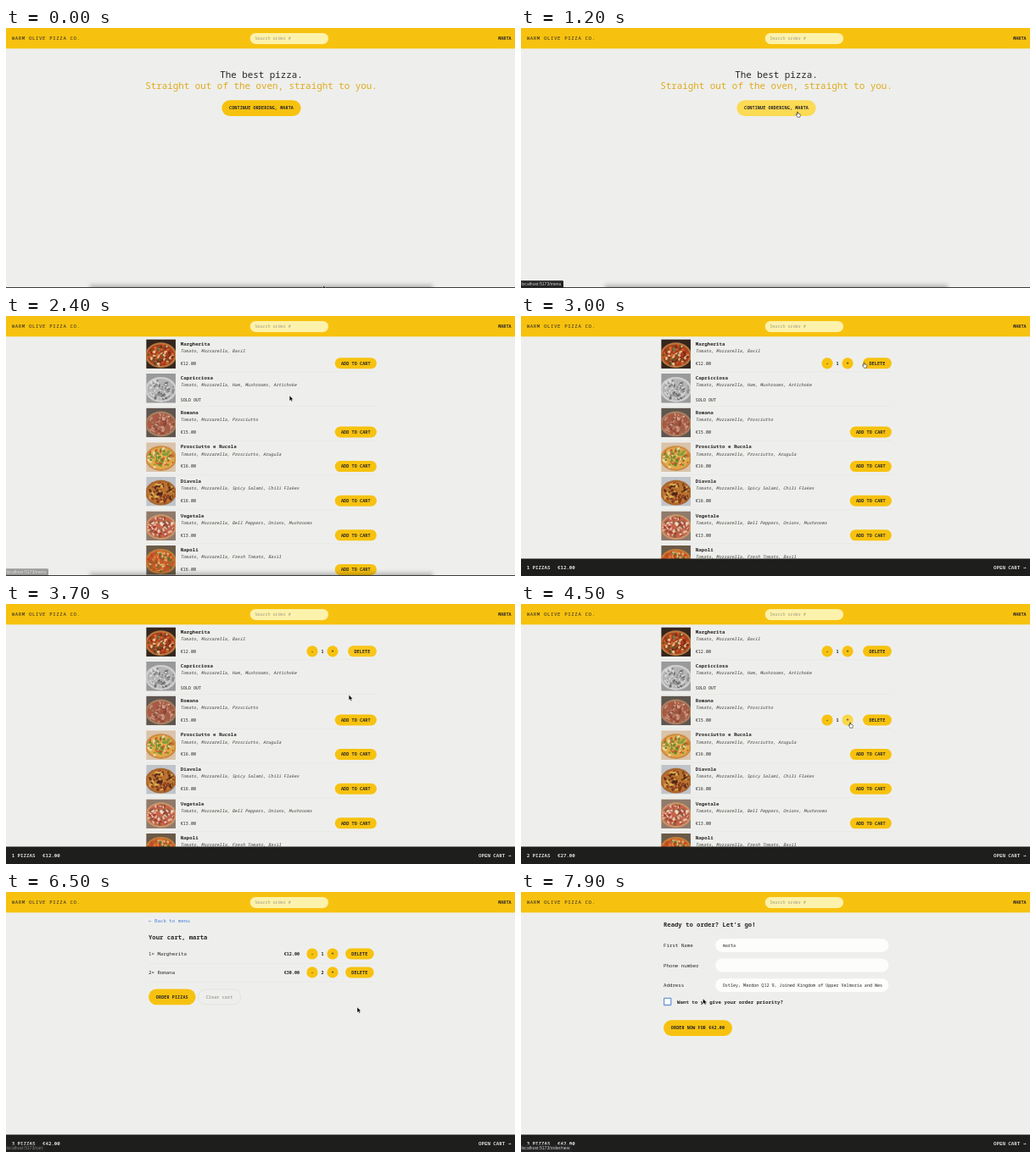
These frames come from a looping animation (600x307 px, 8000 ms). An HTML page:

```html
<!DOCTYPE html>
<html lang="en">
<head>
<meta charset="utf-8">
<title>Pizza ordering</title>
<style>
  html, body { margin: 0; width: 100%; height: 100%; overflow: hidden; background: #eeefec; }
  svg { display: block; }
  #stage { width: 100vw; height: 100vh; }
  text { font-family: "Roboto Mono", "Noto Sans Mono", "DejaVu Sans Mono", monospace; white-space: pre; }
  .arrow { font-family: "DejaVu Sans Mono", monospace; }
  .status { font-family: "Liberation Sans", Arial, sans-serif; }
</style>
</head>
<body>
<svg id="stage" viewBox="0 0 600 307" preserveAspectRatio="none"></svg>
<script>
const LOOP = 8000, STEP = 100;
const YELLOW = [247, 194, 15], LIT = [251, 218, 84];
const INK = '#292524', RULE = '#e2e2df';
const BASE = 5.79, SMALL = 5.07, LARGE = 7.24, HUGE = 10.86;
const USER = 'marta';

const rgb = c => `rgb(${c.map(Math.round)})`;
const clamp = v => Math.max(0, Math.min(1, v));
const mix = (a, b, k) => a + (b - a) * k;

function el(tag, attrs, parent) {
  const node = document.createElementNS('http://www.w3.org/2000/svg', tag);
  for (const k in attrs) node.setAttribute(k, attrs[k]);
  parent.appendChild(node);
  return node;
}
const stage = document.getElementById('stage');
const group = parent => el('g', {}, parent);
const show = (node, on) => { node.style.display = on ? '' : 'none'; };

function rect(parent, x, y, width, height, fill, more) {
  return el('rect', { x, y, width, height, fill, ...more }, parent);
}

// y is the vertical middle of the capitals
function label(parent, str, x, y, size = BASE, more = {}) {
  const node = el('text', { x, y: y + size * 0.36, 'font-size': size, fill: INK, ...more }, parent);
  node.textContent = str;
  return node;
}
const MEDIUM = { 'font-weight': 500 };
const BOLD = { 'font-weight': 600 };
const MID = { 'text-anchor': 'middle' };
const END = { 'text-anchor': 'end' };

function pill(parent, str, x, y, width, height) {
  const box = rect(parent, x, y - height / 2, width, height, rgb(YELLOW), { rx: height / 2 });
  label(parent, str, x + width / 2, y, SMALL, { ...BOLD, ...MID, 'letter-spacing': 0.127 });
  return box;
}

function stepper(parent, y) {
  const dot = (x, sign) => {
    const c = el('circle', { cx: x, cy: y, r: 6.6, fill: rgb(YELLOW) }, parent);
    label(parent, sign, x, y, SMALL, { ...BOLD, ...MID });
    return c;
  };
  dot(361, '-');
  const plus = dot(385, '+');
  const count = label(parent, '1', 373, y, SMALL, { ...MID, ...BOLD });
  return { plus, count };
}

// ---- page and header
const page = group(stage);
rect(page, -20, -20, 640, 350, '#eeefec');
const home = group(page), menu = group(page), cart = group(page), form = group(page);
rect(page, -20, -20, 640, 44.3, rgb(YELLOW));
label(page, 'WARM OLIVE PIZZA CO.', 6.7, 12.4, BASE, { 'letter-spacing': 0.579 });
rect(page, 287.7, 5.9, 92.3, 13, '#fdf2ab', { rx: 6.5 });
label(page, 'Search order #', 293.3, 12.4, SMALL, { fill: '#a39d84' });
label(page, USER.toUpperCase(), 595.5, 12.4, SMALL, { ...END, ...BOLD });

// ---- home
label(home, 'The best pizza.', 301, 55, HUGE, { ...MID, ...MEDIUM });
label(home, 'Straight out of the oven, straight to you.', 301, 68, HUGE,
  { ...MID, ...MEDIUM, fill: '#dfa91b' });
const goOn = pill(home, `CONTINUE ORDERING, ${USER.toUpperCase()}`, 254.4, 94.6, 93.2, 18.8);

// ---- menu
// name, toppings, price, backdrop, crust, sauce, topping colours
const PIZZAS = [
  ['Margherita', 'Basil', 12, '#35261d', '#b9773d', '#a8401f', ['#e9d3a0', '#d9622c', '#5b5a28', '#6f2415']],
  ['Capricciosa', 'Ham, Mushrooms, Artichoke', 0, '#9a9a9a', '#cfcfcf', '#b4b4b4', ['#e0e0e0', '#636363', '#8a8a8a', '#d0d0d0']],
  ['Romana', 'Prosciutto', 15, '#5f5650', '#a9805f', '#a85a45', ['#c98a72', '#8a4434', '#d0ab93', '#96604c']],
  ['Prosciutto e Rucola', 'Prosciutto, Arugula', 16, '#d9c3aa', '#cf8a42', '#dfa949', ['#5b8a2c', '#cf4a2a', '#7d9a3c', '#f0dba0']],
  ['Diavola', 'Spicy Salami, Chili Flakes', 16, '#bfc4c9', '#a9652f', '#b9742f', ['#6b2a1a', '#8e3a1f', '#e3b757', '#4c2117']],
  ['Vegetale', 'Bell Peppers, Onions, Mushrooms', 13, '#8f7a6c', '#cb9468', '#c2644a', ['#f0e0d0', '#e6c3ab', '#a53a28', '#7a6040']],
  ['Napoli', 'Fresh Tomato, Basil', 16, '#6b5a48', '#c57d36', '#bf5a2b', ['#e8c37d', '#c8401f', '#557033', '#e08a3c']],
];

function photo(parent, x, y, seed, [back, crust, sauce, spots]) {
  const p = el('svg', { x, y, width: 34.8, height: 34.75, viewBox: '0 0 35 35' }, parent);
  const rnd = () => (seed = (seed * 16807) % 2147483647) / 2147483647;
  const cx = 17.5, cy = 19;
  rect(p, 0, 0, 35, 35, back);
  el('ellipse', { cx, cy, rx: 18.5, ry: 15, fill: crust }, p);
  el('ellipse', { cx, cy, rx: 16.3, ry: 12.8, fill: sauce }, p);
  for (let i = 0; i < 80; i++) {
    const a = rnd() * 6.283, d = Math.sqrt(rnd());
    const sx = cx + Math.cos(a) * d * 15.5, sy = cy + Math.sin(a) * d * 12;
    el('ellipse', { cx: sx, cy: sy, rx: 0.8 + rnd() * 1.8, ry: 0.6 + rnd() * 1.1, fill: spots[i % 4],
      opacity: 0.85, transform: `rotate(${rnd() * 180} ${sx} ${sy})` }, p);
  }
}

const rows = PIZZAS.map(([name, extra, price, ...look], i) => {
  const y = 27.4 + i * 40.6;
  photo(menu, 165.2, y, 911 + i * 7717, look);
  label(menu, name, 205.8, y + 5.2, BASE, BOLD);
  label(menu, `Tomato, Mozzarella, ${extra}`, 205.8, y + 13.6, SMALL, { 'font-style': 'italic', fill: '#3f3b38' });
  rect(menu, 165, y + 38.2, 272, 0.5, RULE);
  const add = group(menu), chosen = group(menu);
  if (!price) {
    label(menu, 'SOLD OUT', 205.8, y + 31.2, SMALL, { ...BOLD, fill: '#6b6560' });
    return { add, chosen };
  }
  label(menu, `€${price}.00`, 205.8, y + 28.4, SMALL, MEDIUM);
  const addBox = pill(add, 'ADD TO CART', 387.7, y + 28.4, 49.2, 13);
  show(chosen, false);
  const { plus, count } = stepper(chosen, y + 28.4);
  const del = pill(chosen, 'DELETE', 403, y + 28.4, 33.9, 13);
  return { add, chosen, addBox, plus, count, del };
});
const first = rows[0], third = rows[2];

// ---- cart
label(cart, '←', 168, 33.5, BASE, { class: 'arrow', fill: '#4480dd' });
label(cart, 'Back to menu', 175, 33.5, BASE, { fill: '#4480dd' });
label(cart, `Your cart, ${USER}`, 168, 53, LARGE, BOLD);
[[1, 'Margherita', 12], [2, 'Romana', 30]].forEach(([n, name, sum], i) => {
  const y = 73 + i * 21.9;
  label(cart, `${n}× ${name}`, 168, y, BASE, MEDIUM);
  label(cart, `€${sum}.00`, 346, y, SMALL, { ...END, ...BOLD });
  stepper(cart, y).count.textContent = n;
  pill(cart, 'DELETE', 400, y, 33.7, 13);
  rect(cart, 168, y + 11, 265.5, 0.5, RULE);
});
const order = pill(cart, 'ORDER PIZZAS', 168, 123.8, 55.6, 18.8);
rect(cart, 226.4, 114.8, 50.3, 18, 'none', { rx: 9, stroke: '#dddcd9', 'stroke-width': 0.72 });
label(cart, 'Clear cart', 251.5, 123.8, SMALL, { ...MID, ...BOLD, fill: '#a8a29e', 'letter-spacing': 0.127 });

// ---- order form
label(form, "Ready to order? Let's go!", 168, 38.6, LARGE, BOLD);
[['First Name', USER], ['Phone number', ''],
 ['Address', 'Ostley, Merdon Q12 9, Joined Kingdom of Upper Velmoria and Wes']].forEach(([name, value], i) => {
  const y = 63.1 + i * 23.5;
  label(form, name, 168, y);
  rect(form, 229.2, y - 7.8, 204.2, 15.6, '#fdfdfc', { rx: 7.8 });
  label(form, value, 237.8, y, SMALL);
});
const check = rect(form, 168.6, 125.3, 8.2, 8.2, '#fbfcfd', { rx: 0.5 });
label(form, 'Want to yo give your order priority?', 184, 129.5, BASE, BOLD);
pill(form, 'ORDER NOW FOR €42.00', 168, 160.6, 81, 18.8);

// ---- cart bar
const bar = group(page);
const PALE = { ...BOLD, fill: '#dcd9d6' };
rect(bar, -20, 286.5, 640, 40, '#1e1f1c');
const pieces = label(bar, '', 6.7, 296.6, BASE, PALE);
const total = label(bar, '', 43, 296.6, BASE, PALE);
label(bar, 'OPEN CART', 557, 296.6, BASE, PALE);
label(bar, '→', 595.5, 296.6, BASE, { ...PALE, ...END, class: 'arrow' });

// ---- loader
const loader = group(stage);
rect(loader, 0, 0, 600, 307, '#e2e8f0', { opacity: 0.2 });
const bars = [292.7, 299.2, 305.7].map(x => rect(loader, x, 148, 3.26, 10.86, '#1f1d1c'));
const WAVE = [[0.5, 0, 1, 0.5, 0.5, 0.5], [0.5, 0.5, 0, 1, 0.5, 0.5], [0.5, 0.5, 0.5, 0, 1, 0.5]];

// ---- window edge
const edge = group(stage);
const fade = el('linearGradient', { id: 'fade', x1: 0, y1: 0, x2: 0, y2: 1 }, edge);
el('stop', { offset: 0, 'stop-color': '#000', 'stop-opacity': 0.02 }, fade);
el('stop', { offset: 1, 'stop-color': '#000', 'stop-opacity': 0.42 }, fade);
rect(edge, 99, 301, 404, 10, 'url(#fade)', { style: 'filter:blur(2px)' });
rect(edge, 0, 306, 600, 1, '#3a3a3a');

// ---- status bubble and pointer
const status = group(stage);
const bubble = rect(status, -2, 298.2, 52, 10, '#242424', { rx: 1.2 });
const link = label(status, '', 0.4, 302.6, 5.1, { class: 'status', fill: '#cfcfcf' });
const pointer = group(stage);
const arrow = el('path', { d: 'M0 0V6.3L1.5 5 2.5 7.2 3.5 6.7 2.6 4.6H4.5Z',
  fill: '#000', stroke: '#fff', 'stroke-width': 0.4 }, pointer);
const hand = el('path', { d: 'M0 6.8-1.9 3.9Q-2.2 3.1-1.3 3.3L-.5 4V.6Q0-.1 .5 .6V2.5L2.9 3.1Q3.5 3.4 3.3 4.4L2.7 6.8Z',
  fill: '#fff', stroke: '#111', 'stroke-width': 0.55 }, pointer);

// ---- timeline
const LOAD = 1670, MENU = 2300, ADD1 = 2900, ADD2 = 4050, ADD3 = 4650, CART = 6150, FORM = 7600;
const PATH = [
  [0, 374, 304], [900, 326, 98.5], [2300, 326, 98.5], [2800, 404.5, 54.5], [3400, 404.5, 54.5],
  [3900, 404, 136], [4100, 404, 136], [4400, 388, 139.5], [4800, 388, 139.5], [5400, 561, 296],
  [6150, 561, 296], [6500, 414, 136], [6600, 412, 135], [7000, 200, 124], [7600, 200, 124],
  [7900, 214.5, 126],
];
const HANDS = [[900, LOAD], [2700, 3450], [3800, 4900], [5300, 6200], [6900, FORM]];
const LINKS = [[1000, 2500, 'menu', 50], [5500, 6640, 'cart', 46], [7000, 8300, 'order/new', 60]];
const HOVERS = [
  [goOn, 900, LOAD], [first.addBox, 2700, ADD1], [first.del, 3000, 3450],
  [third.addBox, 3850, ADD2], [third.del, ADD2, 4200], [third.plus, 4250, 4900], [order, 6900, FORM],
];

function place(t) {
  let i = 0;
  while (i < PATH.length - 2 && t >= PATH[i + 1][0]) i++;
  const [a, ax, ay] = PATH[i], [b, bx, by] = PATH[i + 1];
  const k = clamp((t - a) / (b - a)), e = k * k * (3 - 2 * k);
  return [mix(ax, bx, e), mix(ay, by, e)];
}

function draw(t) {
  const loading = t >= LOAD && t < MENU;
  show(home, t < MENU);
  show(menu, t >= MENU && t < CART);
  show(cart, t >= CART && t < FORM);
  show(form, t >= FORM);
  show(bar, t >= ADD1);
  show(edge, t < ADD1);

  [[first, ADD1], [third, ADD2]].forEach(([row, at]) => {
    show(row.add, t < at);
    show(row.chosen, t >= at);
  });
  third.count.textContent = t < ADD3 ? 1 : 2;
  const [n, sum] = t < ADD2 ? [1, 12] : t < ADD3 ? [2, 27] : [3, 42];
  pieces.textContent = `${n} PIZZAS`;
  total.textContent = `€${sum}.00`;

  for (const [node, from, to] of HOVERS) {
    const k = clamp((t - from) / 300) * clamp(1 - (t - to) / 300);
    node.setAttribute('fill', rgb(YELLOW.map((c, i) => mix(c, LIT[i], k))));
  }
  const focus = t >= 7700;
  check.setAttribute('stroke', focus ? '#6d98d6' : '#a8a29e');
  check.setAttribute('stroke-width', focus ? 1.3 : 0.4);

  page.style.filter = loading ? 'blur(1.45px)' : 'none';
  show(loader, loading);
  const phase = ((t - LOAD + LOOP) % 1000) / 200, s = Math.floor(phase);
  bars.forEach((b, i) =>
    b.setAttribute('y', 142.6 + 10.86 * mix(WAVE[i][s], WAVE[i][s + 1], phase - s)));

  const hint = LINKS.find(([from, to]) => t >= from && t < to);
  show(status, hint);
  if (hint) {
    link.textContent = `localhost:5173/${hint[2]}`;
    bubble.setAttribute('width', hint[3] + 2);
    status.setAttribute('opacity', clamp((hint[1] - t) / 250));
  }

  const over = HANDS.some(([from, to]) => t >= from && t < to);
  show(hand, over);
  show(arrow, !over);
  pointer.setAttribute('transform', `translate(${place(t)})`);
}

const start = performance.now();
function tick() {
  const t = (performance.now() - start) % LOOP;
  draw(Math.floor(t / STEP) * STEP);
  requestAnimationFrame(tick);
}
tick();
</script>
</body>
</html>
```
